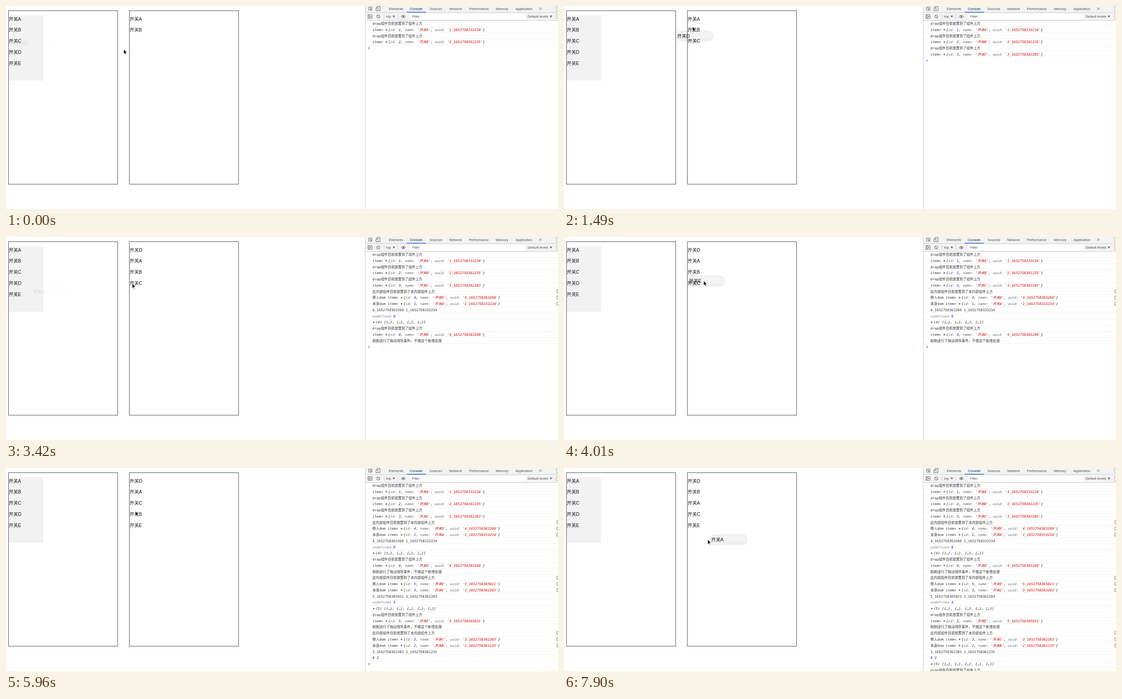
Animation of 1233x454 px, one loop 8000 ms. Source, as an HTML page:

```html
<!DOCTYPE html>
<html lang="zh">
<head>
<meta charset="utf-8">
<title>拖动排序</title>
<style>
  html, body { margin: 0; width: 100%; height: 100%; overflow: hidden; background: #fff; }
  svg { display: block; }
  text { white-space: pre; }
  .list text, #ghost text { font: 10.4px "Liberation Sans", "Noto Sans CJK SC", "Noto Sans CJK", sans-serif; fill: #111; }
  #ghost { mix-blend-mode: multiply; }
  .ui text { font: 7.74px "Liberation Sans", Arial, sans-serif; fill: #484b4f; }
  .ui .active { fill: #202124; }
  .log text { font: 7.74px "DejaVu Sans Mono", "Noto Sans CJK SC", "Noto Sans CJK", monospace; fill: #303134; }
  .log .obj { font-style: italic; fill: #202124; }
  .log .key { fill: #5f6368; }
  .log .str { fill: #c80000; }
  .log .num { fill: #1a1aa6; }
  .log .dim { fill: #808080; }
  .icon { fill: none; stroke: #5f6368; stroke-width: 1; }
</style>
</head>
<body>
<svg width="1233" height="454" viewBox="0 0 1233 454">
  <rect width="1233" height="454" fill="#fff"/>
  <rect x="6" y="21" width="77" height="146" fill="#f2f2f2"/>
  <g fill="none" stroke="#484848">
    <rect x="5.5" y="10.5" width="244" height="388"/>
    <rect x="275.5" y="10.5" width="244" height="388"/>
  </g>
  <g class="list" id="left"></g>
  <g class="list" id="right"></g>

  <rect x="803" width="430" height="32" fill="#f3f3f3"/>
  <path d="M802.5 0V454M803 14.5H1233M803 32.5H1233M844.5 18V28M875.5 18V28" fill="none" stroke="#cbcbcb"/>
  <rect x="895" y="13" width="43" height="1.6" fill="#1a73e8"/>
  <rect x="903" y="17" width="257" height="13" fill="#fff"/>
  <g class="ui">
    <text x="855" y="8.8">Elements</text>
    <text x="902" y="8.8" class="active">Console</text>
    <text x="946" y="8.8">Sources</text>
    <text x="990" y="8.8">Network</text>
    <text x="1034" y="8.8">Performance</text>
    <text x="1094" y="8.8">Memory</text>
    <text x="1138" y="8.8">Application</text>
    <text x="849" y="26.2">top</text>
    <text x="907" y="26.2">Filter</text>
    <text x="1165" y="26.2">Default levels</text>
  </g>
  <g class="icon">
    <path d="M1190.5 3.5l2.5 2.5l-2.5 2.5M1193.5 3.5l2.5 2.5l-2.5 2.5"/>
    <path d="M812 9.5H810V2.5H817.5V5M813 5L818 7L815.5 8L814.5 10.5ZM815.5 8L818 10.5"/>
    <path d="M828.5 4V1.5H835.5V10.5H832M826.5 4.5H831V10.5H826.5Z"/>
    <path d="M808.5 19.5H817.5V27.5H808.5ZM811 19.5V27.5"/>
    <path d="M813 21.5L816 23.5L813 25.5Z" fill="#5f6368" stroke="none"/>
    <circle cx="831.5" cy="23.5" r="3.6"/><path d="M829 21L834 26"/>
    <path d="M882.5 23.5Q887.5 17.5 892.5 23.5Q887.5 29.5 882.5 23.5Z"/>
    <circle cx="887.5" cy="23.5" r="1.4" fill="#5f6368"/>
    <path d="M1233 .5H1229.5V11.5H1233M1233 18.5H1229.5V28.5H1233" stroke="#b5b5b5"/>
  </g>
  <path d="M863.5 21.5H869L866.25 26ZM1214.5 21.5H1220L1217.25 26Z" fill="#5f6368"/>
  <g class="log" id="log"></g>
  <path id="prompt" d="M0 -2L2.5 0L0 2" fill="none" stroke="#367cf1" stroke-width="1.2"/>

  <g id="ghost">
    <rect x="-2" y="-12" width="83" height="25" rx="12" fill="#f0f0f0"/>
    <rect x="1" y="-8" width="76" height="15" rx="3" fill="#f4f4f4"/>
    <path d="M2 6.5H75" stroke="#e5e5e5"/>
    <text y="3.9"></text>
  </g>
  <path id="cursor" d="M0 0V10.5L2.4 8.3L4 12L5.6 11.3L4 7.7H7.4Z" fill="#000" stroke="#fff" stroke-width=".7"/>
</svg>
<script>
const $ = id => document.getElementById(id);
const LOOP = 8000, STEP = 148.6;
const ROW = 13.76, EM = 7.74, CELL = 4.66, LOG_X = 818.5;
const LAG = .8, GRIP = 33;

// Pointer moves, in steps; it rests between them.
const moves = [
  { from: -1, to: 0, x: 263, y: 97 },
  { from: 3, to: 6, x: 22, y: 106 },
  { from: 7, to: 9, x: 285, y: 72 },
  { from: 9, to: 10, x: 287, y: 46 },
  { from: 10, to: 12, x: 295, y: 37 },
  { from: 14, to: 20, x: 46, y: 126 },
  { from: 22, to: 23, x: 282, y: 104 },
  { from: 23, to: 25, x: 312, y: 98 },
  { from: 29, to: 31, x: 464, y: 69 },
  { from: 32, to: 36, x: 289, y: 124 },
  { from: 37, to: 40, x: 289, y: 96.5 },
  { from: 41, to: 44, x: 290, y: 56 },
  { from: 45, to: 48, x: 39, y: 28 },
  { from: 49, to: 52, x: 372, y: 160 },
  { from: 52, to: 53, x: 321, y: 160 }
];

// An item is dropped before another one, or at the end of the list.
const drags = [
  { item: 3, grab: 0, release: 3, update: 3 },
  { item: 4, before: 1, grab: 9, release: 12, update: 14 },
  { item: 5, before: 3, grab: 23, release: 28, update: 31 },
  { item: 3, before: 2, grab: 37, release: 39, update: 40, grip: 13 },
  { item: 2, before: 1, grab: 41, release: 44, update: 44, grip: 13 },
  { item: 1, grab: 50, release: Infinity, update: Infinity }
];

const label = id => '开关' + 'ABCDE'[id - 1];
const uuid = id => id + '_1652758' + [333234, 361235, 362283, 363260, 365021][id - 1];
const textWidth = s => [...s].reduce((w, c) => w + (c > '\u00ff' ? EM : CELL), 0);
const span = (cls, s) => `<tspan class="${cls}">${s}</tspan>`;
const text = (x, y, s, cls = '') => `<text x="${x}" y="${y}" class="${cls}">${s}</text>`;

// A log line is a function from its baseline to markup.
const plain = s => y => text(LOG_X, y, s);
const folded = (title, body) => y => {
  const x = LOG_X + (title ? textWidth(title) + CELL : 0);
  return text(LOG_X, y, title) + text(x + 7.2, y, body, 'obj') +
    `<path d="M${x + 1.7} ${y - 5}l3.8 2.3l-3.8 2.3z" fill="#5f6368"/>`;
};
const linked = line => y => line(y) +
  `<path d="M1233 ${y - 6.5}h-2.5v7h2.5" fill="none" stroke="#777"/>`;
const field = (key, cls, value) => span('key', key + ':') + ' ' + span(cls, value);
const entry = (title, id) => folded(title, '{' + [
  field('id', 'num', id), field('name', 'str', `'${label(id)}'`), field('uuid', 'str', `'${uuid(id)}'`)
].join(', ') + '}');

const dropped = id => [plain('drap组件目前放置到了组件上方'), entry('item=', id)];
const sorting = (id, before, was, now) => [
  linked(plain('此内部组件目前放置到了本内部组件上方')),
  linked(entry('移入dom item=', id)),
  linked(entry('本身dom item=', before)),
  plain(uuid(id) + ' ' + uuid(before)),
  plain((was < 0 ? span('dim', 'undefined') : span('num', was)) + ' ' + span('num', now))
];
const sorted = (id, size) => [
  folded('', `(${size}) [${Array(size).fill('{…}').join(', ')}]`),
  ...dropped(id),
  plain('刚刚进行了拖动排序事件，不做这个新增处理')
];

// Play the drags through once to get every list and log line with its step.
const lists = [{ step: 0, items: [1, 2] }];
const log = [];
const print = (step, lines) => lines.forEach(line => log.push({ step, line }));
print(0, [...dropped(1), ...dropped(2)]);
for (const { item, before, update } of drags) {
  const old = lists[lists.length - 1].items;
  const was = old.indexOf(item);
  const items = old.filter(id => id !== item);
  const now = before ? items.indexOf(before) : items.length;
  items.splice(now, 0, item);
  lists.push({ step: update, items });
  if (before) {
    print(update, sorting(item, before, was, now));
    print(was < 0 ? update : update + 1, sorted(item, items.length));
  } else {
    print(update, dropped(item));
  }
}

function pointerAt(n) {
  let x = 4, y = 80;
  for (const m of moves) {
    const k = Math.min(1, Math.max(0, (n - m.from) / (m.to - m.from)));
    x += (m.x - x) * k;
    y += (m.y - y) * k;
  }
  return { x, y };
}

const listMarkup = (x, items) =>
  items.map((id, i) => text(x, 32.5 + 24.8 * i, label(id))).join('');

const logMarkup = entries => entries.map(({ line }, i) => {
  const y = +(42 + ROW * i).toFixed(2);
  return `<path d="M803 ${Math.floor(y + 4) + .5}H1233" stroke="#f0f0f0"/>` + line(y);
}).join('');

const place = (el, x, y) => el.setAttribute('transform', `translate(${x} ${y})`);

function draw(n) {
  const printed = log.filter(e => e.step <= n);
  $('right').innerHTML = listMarkup(276, lists.filter(l => l.step <= n).pop().items);
  $('log').innerHTML = logMarkup(printed);
  place($('prompt'), 809.5, 39.3 + ROW * printed.length);

  const pointer = pointerAt(n);
  place($('cursor'), pointer.x, pointer.y);

  const drag = drags.find(d => n >= d.grab && n < d.release);
  const ghost = $('ghost');
  ghost.style.display = drag ? '' : 'none';
  if (drag) {
    const trail = pointerAt(n - LAG);
    place(ghost, trail.x - (drag.grip || GRIP), trail.y);
    ghost.style.opacity = Math.min(1, .12 + .88 * (n - drag.grab));
    ghost.querySelector('text').textContent = label(drag.item);
  }
}

$('left').innerHTML = listMarkup(6, [1, 2, 3, 4, 5]);

const begin = performance.now();
let shown = -1;
function tick() {
  const n = Math.floor((performance.now() - begin) % LOOP / STEP);
  if (n !== shown) draw(shown = n);
  requestAnimationFrame(tick);
}
tick();
</script>
</body>
</html>
```
